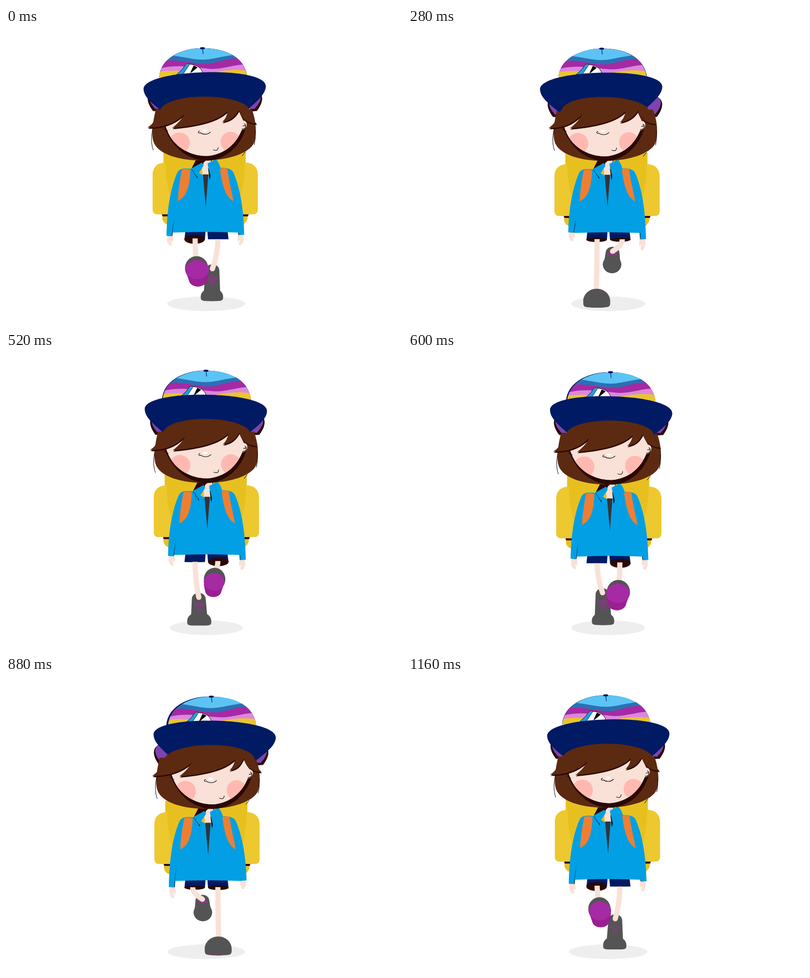
An HTML page with a canvas that plays this animation: 800 by 600 pixels, repeating every 1200 ms.

```html
<!DOCTYPE html>
<html lang="en">
<head>
<meta charset="utf-8">
<title>Walking hiker</title>
<style>
html, body { margin: 0; width: 100%; height: 100%; overflow: hidden; background: #fff; }
canvas { display: block; width: 800px; height: 600px; }
</style>
</head>
<body>
<canvas id="stage" width="800" height="600"></canvas>
<script>
const ctx = document.getElementById('stage').getContext('2d');
const LOOP = 1200, HALF = 600, STEP = 40;
const C = {
  navy: '#001a63', hair: '#5c2a10', dark: '#2a0803', skin: '#f9e1d7', cheek: '#ffb9b0',
  blue: '#029fe4', orange: '#ee7f32', pocket: '#edc82f', pack: '#e7c020', grey: '#545454',
  sole: '#a52aa4', heel: '#9a1f92', flap: '#7d43ae', black: '#0b0708'
};

// Cosine that peaks at the given time.
const wave = (t, peak, period = LOOP) => Math.cos(2 * Math.PI * (t - peak) / period);
const plus = v => Math.max(0, v);
const unit = v => Math.min(1, plus(v));
const bob = t => -.3 + 4.2 * wave(t, 150, HALF);

const fill = (d, color) => { ctx.fillStyle = color; ctx.fill(new Path2D(d)); };
const line = (d, color = C.black, width = 1) => {
  ctx.strokeStyle = color;
  ctx.lineWidth = width;
  ctx.stroke(new Path2D(d));
};
const oval = (x, y, rx, ry, color) => {
  ctx.fillStyle = color;
  ctx.beginPath();
  ctx.ellipse(x, y, rx, ry, 0, 0, 7);
  ctx.fill();
};
function group(dx, dy, draw) {
  ctx.save();
  ctx.translate(dx, dy);
  draw();
  ctx.restore();
}
function mirror(axis, draw) {
  ctx.save();
  ctx.translate(2 * axis, 0);
  ctx.scale(-1, 1);
  draw();
  ctx.restore();
}
function both(axis, draw) {
  draw();
  mirror(axis, draw);
}

// Shape of the left shoe; the right one runs half a loop later.
function footPose(t, stomp) {
  const bottom = 530 + 43 * wave(t, 403) + 16 * wave(t, 140, HALF) + stomp * plus(wave(t, 140)) ** 12;
  return {
    x: 389.5 + 9 * wave(t, 800),
    top: bottom - 37 - 10.5 * wave(t, 0),
    bottom,
    r: 23 + 4.2 * wave(t, 280),
    flat: unit(.5 + .9 * wave(t, 390)),
    rise: 50 * wave(t, 650),
    soleR: 8 + 16 * wave(t, 40),
    soleH: 54 * plus(wave(t, -5)) ** 1.4
  };
}

function drawLaces(x, y, shaft) {
  ctx.globalAlpha = unit(shaft / 18);
  line(`M${x - 9},${y + 2} Q${x},${y - 9} ${x + 9},${y + 2} M${x - 10},${y} Q${x},${y + 4} ${x + 10},${y}`, C.sole, 1.4);
  if (shaft > 32) {
    for (let k = 1; k < 4; k++) line(`M${x - 7 + k},${y + k * 4.5} h${14 - 2 * k}`, C.sole, 1.2);
  }
  ctx.globalAlpha = 1;
}

function drawSole(x, bottom, r, h) {
  const y = bottom - h, hx = x + r * .07;
  fill(`M${x - r * .95},${y + h * .45} L${hx - r * .78},${y + h * .75}
    C${hx - r * .65},${y + h * 1.08} ${hx + r * .65},${y + h * 1.08} ${hx + r * .8},${y + h * .75} L${x + r},${y + h * .45}Z`, C.heel);
  oval(x, y + h * .36, r, h * .36, C.sole);
}

function drawShoe({ x, top, bottom, r, flat, rise, soleR, soleH }) {
  const h = bottom - top, m = top + h * (.5 + .15 * flat), up = m - .55 * (m - top);
  const low = m + (bottom - m) * (.55 + .4 * flat), q = r * (.55 + .47 * flat);
  if (rise > 0) {
    const y = top - rise;
    fill(`M${x - 17},${m} L${x - 15},${y + 12} C${x - 14},${y - 4} ${x + 12},${y - 4} ${x + 13},${y + 12} L${x + 17},${m}Z`, C.grey);
  }
  fill(`M${x - r},${m} C${x - r},${up} ${x - r * .55},${top} ${x},${top} S${x + r},${up} ${x + r},${m}
    C${x + r},${low} ${x + q},${bottom} ${x},${bottom} S${x - r},${low} ${x - r},${m}Z`, C.grey);
  if (rise > 4) drawLaces(x, top - rise * .55 + 6, rise);
  if (soleR > 4 && soleH > .5) drawSole(x + 1, bottom + soleH * .26 + .2, soleR, soleH);
}

function drawLeg(t, stomp) {
  const foot = footPose(t, stomp);
  const hem = 428.5 + .9 * bob(t), open = 4.6 + 4.5 * wave(t, 0);
  const hx = 382 - 5 * plus(wave(t, 860)) ** 4, hy = hem - open * .2;
  const ax = foot.x - 1, ay = foot.top - plus(foot.rise) + 9;
  const limb = () => {
    line(`M${hx},${hy} Q${hx},${(hy + ay) / 2} ${ax},${ay}`, C.skin, 10.5);
    oval(ax, ay, 5.3, 5.3, C.skin);
  };
  fill(`M363,405 H403.5 L402,${hem} H360.5Z`, C.navy);
  oval(381, hem, 20.7, open, C.dark);
  if (foot.rise <= 0) limb();
  drawShoe(foot);
  if (foot.rise > 0) limb();
}

function drawLegs(t) {
  const left = () => drawLeg(t, 16);
  const right = () => mirror(405, () => drawLeg(t + HALF, 0));
  const order = wave(t, 0) > 0 ? [right, left] : [left, right];
  order.forEach(draw => draw());
}

function drawPack() {
  fill('M318,250 H484 V376 C490,380 490,390 480,398 H324 C314,392 314,384 318,376Z', C.pack);
  both(402.3, () => {
    fill('M314,376 H328 V382 H316Z', C.dark);
    fill('M296,298 C296,282 306,273 322,273 Q322,310 331,340 V378 H306 Q296,378 296,368Z', C.pocket);
  });
}

function drawArm(t) {
  const y = 420.5 + 7 * wave(t, 930), e = y + 20.5 + 2.5 * wave(t, 850);
  fill(`M326,${y - 3} L325,${y + 10} Q327,${e - 2} 331,${e} Q336,${e} 335,${e - 4} L333,${y + 10} L337,${e - 7} Q339,${y + 8} 336,${y - 3}Z`, C.skin);
  fill(`M374,286 C360,284 350,285 346,293 C333,322 325,365 324,${y} L335,${y + 1} L340,395Z`, C.blue);
  line(`M343,373 C339,390 337,402 335.5,${y}`);
}

function drawBody(t) {
  fill('M374,286 L390,255 H418 L412,282 H398Z', C.dark);
  fill('M396,284 L399,273 L413,260 L414,276 L408,300 H397Z', C.skin);
  drawArm(t);
  mirror(402.5, () => drawArm(t + HALF));
  fill('M350,290 Q356,285 374,286 L397,298 H409 L430,284 Q450,282 457,291 L470,415 Q404,412 336,415Z', C.blue);
  fill('M397,280 H407 L408,298 H397Z', C.skin);
  fill('M397.5,297 H408.5 L403.3,362Z', '#343338');
  fill('M374,286 L383,286 L387,306Z', C.black);
  fill('M408,284 L416,292 L411,308Z', C.black);
  fill('M374,285 L396,273 L399,279 L385,301Z', C.blue);
  fill('M407,275 L424,266 Q431,274 434,287 L414,304Z', C.blue);
  line('M374,286 L385,302 M408,278 L413,304', '#0774b4', .7);
  fill('M355,288 Q362,284 372,288 C371,315 367,342 347,351 C348,325 352,305 355,288Z', C.orange);
  fill('M432,286 Q440,281 447,286 C450,312 456,330 459,351 C442,342 436,315 432,286Z', C.orange);
}

function drawFlaps() {
  both(401, () => {
    fill('M310,128 C280,128 280,150 296,171 L310,172Z', C.dark);
    fill('M312,125 C284,126 281,146 301,167 L322,166Z', C.flap);
  });
}

function drawBackHair() {
  fill('M302,165 C295,195 293,216 297,230 C306,257 350,269 400,269 C450,268 490,254 500,234 C506,218 506,192 496,165Z', C.hair);
  line('M296,204 C292,222 293,238 297,248 M503,208 Q504,224 501,237 M483,251 L476,260');
}

function drawFace() {
  fill('M319,200 C335,245 370,269 405,269 C443,268 474,240 485,200Z', C.dark);
  const shape = new Path2D('M322,200 C334,240 370,260 405,260 C440,258 465,235 476,207 C488,207 490,188 479,188 L466,160 H340Z');
  ctx.save();
  ctx.clip(shape);
  ctx.fillStyle = C.skin;
  ctx.fill(shape);
  oval(350, 233, 21, 21, C.cheek);
  oval(453, 231, 20, 20.5, C.cheek);
  ctx.restore();
  oval(401, 208, 5, 2, '#fff');
  line('M391,209 C386,210 388,215 392,212.5 C398,217 407,217 413,211', C.black, 1.1);
  line('M418,247 Q428,251 428,242', C.black, 1.1);
  line('M476,205 C483,206 487,199 481,194 M478,199 L483,198', C.black, 1.2);
  line('M317,204 L327,209');
}

// l, m and r shift the left tip, the middle locks and the right tip.
function drawBangs(l, m, r) {
  const d = `M${285 + l},202 C${301 + l},193 ${303 + l},176 ${314 + l},161
    C${340 + m},132 ${460 + m},132 ${489 + r},161 C${496 + r},172 ${496 + r},186 ${506 + r},194
    C${490 + r},194 ${476 + r},186 ${470 + r},167 C${464 + r},178 ${455 + m},188 ${436 + m},191
    C${443 + m},184 ${446 + m},178 ${447 + m},169 C${422 + m},193 ${375 + m},199 ${335 + m},203
    C${347 + m},194 ${355 + m},184 ${360 + m},174 C${343 + m},193 ${315 + l},203 ${285 + l},202Z`;
  ctx.save();
  ctx.beginPath();
  ctx.rect(270, 168, 260, 60);
  ctx.clip();
  group(1, 2.5, () => fill(d, C.dark));
  ctx.restore();
  fill(d, C.hair);
}

const CROWN = 'M308.5,100 C310,64 350,41 396,41 C447,41 482,62 486.5,100Z';

function drawCrown() {
  ctx.save();
  ctx.clip(new Path2D(CROWN));
  const band = (edge, color) => fill(`M300,${edge} V105 H300Z`, color);
  fill(CROWN, '#5bc4f5');
  band('54 C350,54 375,67 405,64 C430,61 450,53 500,52', '#2c70b3');
  band('70 C340,58 375,75 408,73 C435,69 450,58 500,62', C.sole);
  band('85 C340,72 375,80 410,83 C440,85 460,72 500,74', '#dc87df');
  band('91 C330,83 370,88 400,93 C430,88 460,80 500,90', '#e9c52d');
  ctx.restore();
  fill('M343,95 L356,83 Q362,72 367,73 L379,75 Q394,80 396,92 L392,96Z', '#fff');
  fill('M343,95 L356,83 Q362,72 370,74 L356,95Z', '#1c9fe0');
  fill('M378,76 L386,80 L374,90 L371,91Z', C.black);
  line('M343,95 L356,83 Q362,72 367,73 L379,75 Q394,80 396,92');
  line('M370,74 L356,95', C.black, .7);
  oval(395.7, 41.3, 5, 2.2, C.navy);
  line('M396,43 L397,53', C.navy, 1.2);
}

function drawBrim(tilt) {
  ctx.save();
  ctx.translate(400.5, 120);
  ctx.rotate(tilt * Math.PI / 180);
  fill('M-123.5,1 C-123.5,-19 -66,-30 0,-30 S123.5,-19 123.5,1 C123.5,18 103,33 87,47 H-87 C-103,33 -123.5,18 -123.5,1Z', C.navy);
  ctx.restore();
}

function draw(t) {
  ctx.fillStyle = '#fff';
  ctx.fillRect(0, 0, 800, 600);

  // Each layer sways a little later and wider the higher it sits.
  const body = 2.4 - 3.2 * wave(t, 160);
  const hair = 3.8 - 5.4 * wave(t, 180);
  const crown = 7.3 - 12.8 * wave(t, 205);
  const brim = 5.4 - 16 * wave(t, 245);
  const face = 3 - 9.8 * wave(t, 250);
  const dy = bob(t);

  oval(404.5, 559, 76.5 + 3 * wave(t, 1060), 15, '#eeeeee');
  group(body * .75, 1 + 4.2 * wave(t, 180, HALF), drawPack);
  drawLegs(t);
  group(body, dy, () => drawBody(t));
  group(crown * .7, 3 + 6.5 * wave(t, 250, HALF), drawFlaps);
  group(hair, dy, drawBackHair);
  group(face, dy, drawFace);
  group(crown * .8, dy, () => fill(CROWN, C.navy));
  group(crown, dy, drawCrown);
  group(brim, dy, () => drawBrim(-2.1 * wave(t, 130)));
  group(0, dy, () => drawBangs(hair * 1.2, face * 1.2, face * .8));
}

const start = performance.now();
function tick(now) {
  const t = Math.max(0, now - start) % LOOP;
  draw(Math.floor(t / STEP) * STEP);
  requestAnimationFrame(tick);
}
draw(0);
requestAnimationFrame(tick);
</script>
</body>
</html>
```
